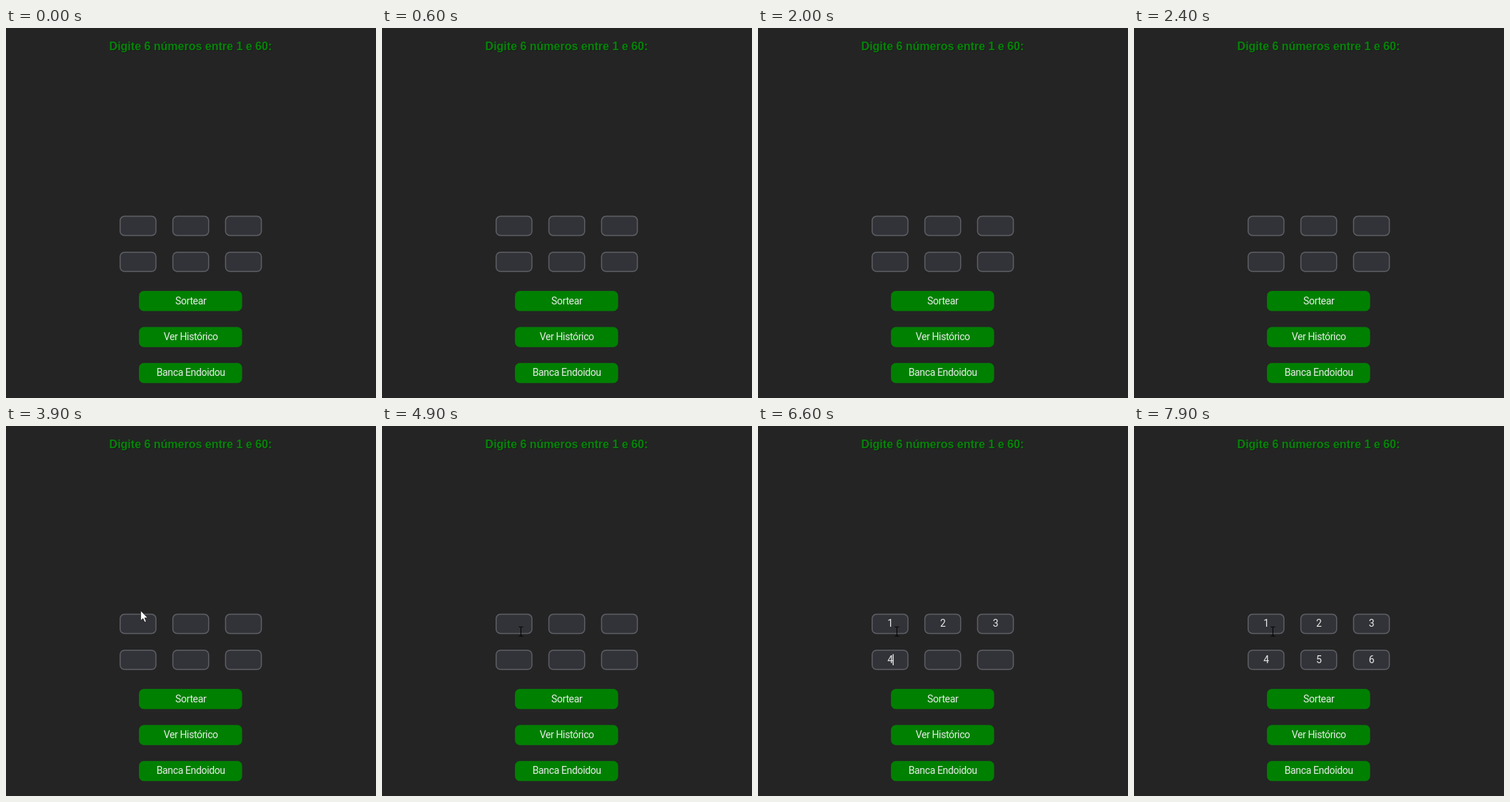
Animation, 518 px wide and 518 px high, one loop 8 s. Source, as an HTML page:

```html
<!DOCTYPE html>
<html lang="pt-BR">
<head>
<meta charset="utf-8">
<title>Sorteio</title>
<style>
  html, body { margin: 0; width: 100%; height: 100%; overflow: hidden; background: #242424; }
  svg { display: block; width: 100vw; height: 100vh; }
  text { font: 14px Roboto, Arial, sans-serif; letter-spacing: -.36px; fill: #e8ece8; text-anchor: middle; }
  .title { font: bold 16px "Liberation Sans", Arial, sans-serif; letter-spacing: 0; fill: #058408; text-shadow: 1px 1px 1px rgba(0, 0, 0, .3); }
  .field { fill: #323338; stroke: #5e5f65; stroke-width: 1.5; }
  .button { fill: #008000; stroke: #0b7a0d; filter: drop-shadow(0 .5px .7px rgba(0, 0, 0, .35)); }
  .arrow { fill: #fff; stroke: #111; stroke-width: .7; }
  .beam { fill: none; stroke: #050505; stroke-width: 1.1; }
</style>
</head>
<body>
<svg id="stage" viewBox="0 0 518 518">
  <text class="title" x="258.4" y="30.6">Digite 6 números entre 1 e 60:</text>
</svg>
<script>
const LOOP = 8000;
const stage = document.getElementById("stage");

function add(tag, attrs, text = "") {
  const el = document.createElementNS("http://www.w3.org/2000/svg", tag);
  for (const key in attrs) el.setAttribute(key, attrs[key]);
  el.textContent = text;
  stage.append(el);
  return el;
}

const fields = Array.from({ length: 6 }, (_, i) => {
  const x = 185 + (i % 3) * 73.8;
  const y = 277 + Math.floor(i / 3) * 50.4;
  add("rect", { class: "field", x: x - 25.2, y: y - 13.4, width: 50.1, height: 26.8, rx: 6 });
  return { x, y, digit: add("text", { x, y: y + 4.2 }, i + 1) };
});

["Sortear", "Ver Histórico", "Banca Endoidou"].forEach((label, i) => {
  const y = 368.6 + i * 50.4;
  add("rect", { class: "button", x: 186.7, y, width: 143.4, height: 27.3, rx: 6 });
  add("text", { x: 258.7, y: y + 17.9 }, label);
});

const caret = add("rect", { width: 1.2, height: 15.5, fill: "#fff" });
const arrow = add("path", { class: "arrow", d: "M0 0V13.9L3.2 10.9L5.5 16L7.7 15.1L5.6 10.1H9.8Z" });
const beam = add("path", { class: "beam", d: "M-3-6.5H-1L0-5.7L1-6.5H3M0-5.7V5.7M-3 6.5H-1L0 5.7L1 6.5H3" });

// [time, shape, x, y]
const pointerSteps = [
  [0], [1600, arrow, 506.3, 455], [1700],
  [3700, arrow, 144.5, 190.5], [3800, arrow, 175, 237], [3900, arrow, 188.6, 258.6],
  [4000, beam, 193, 276], [4100, beam, 194, 282],
  [4200, beam, 194.3, 286], [4300, beam, 194.5, 287.8]
];

// [time, digits typed, index of the focused field or -1]
const typingSteps = [
  [0, 0, -1], [4300, 0, 0], [4900, 0, -1], [5200, 0, 0],
  [5600, 1, 0], [5800, 1, 1], [5900, 2, 1], [6100, 2, 2],
  [6300, 3, 2], [6400, 3, 3], [6600, 4, 3], [6800, 4, 4],
  [7000, 5, 4], [7200, 5, 5], [7800, 6, 5], [7900, 6, -1]
];

const stepAt = (steps, t) => steps.findLast(step => step[0] <= t);
const show = (el, on) => el.setAttribute("visibility", on ? "visible" : "hidden");

function draw(t) {
  const [, shape, x, y] = stepAt(pointerSteps, t);
  for (const el of [arrow, beam]) show(el, el === shape);
  if (shape) shape.setAttribute("transform", `translate(${x} ${y})`);

  const [, count, focus] = stepAt(typingSteps, t);
  fields.forEach((field, i) => show(field.digit, i < count));
  show(caret, focus >= 0);
  if (focus >= 0) {
    const field = fields[focus];
    caret.setAttribute("x", field.x + (focus < count ? 3.6 : 0));
    caret.setAttribute("y", field.y - 8);
  }
}

const start = performance.now();
function tick() {
  draw((performance.now() - start) % LOOP);
  requestAnimationFrame(tick);
}
tick();
</script>
</body>
</html>
```
